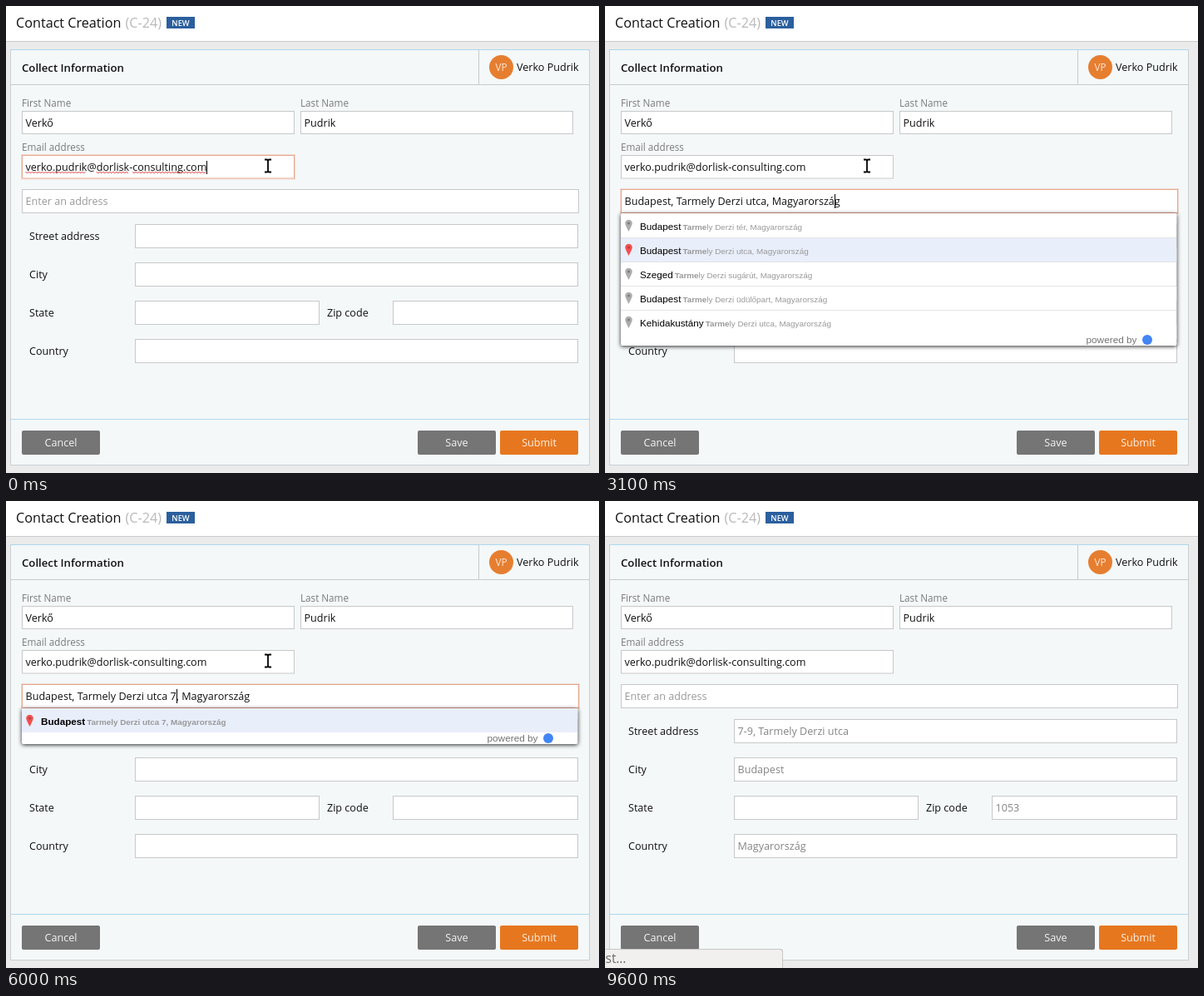
An HTML page with a canvas for the animation above (10 s loop, 713 px wide and 561 px high).

```html
<!DOCTYPE html>
<html lang="en">
<head>
<meta charset="utf-8">
<title>Contact Creation</title>
<style>
html, body { margin: 0; width: 100%; height: 100%; overflow: hidden; background: #ebebeb; }
canvas { display: block; }
</style>
</head>
<body>
<canvas id="stage" width="713" height="561"></canvas>
<script>
const ctx = document.getElementById('stage').getContext('2d');
const LOOP = 10000;
const SANS = '"Open Sans", "Noto Sans", sans-serif';
const ARIAL = '"Liberation Sans", Arial, sans-serif';
const BODY = `12.6px ${SANS}`;
const LABEL = `11.7px ${SANS}`;
const BORDER = '#c8c8c8';
const FOCUS = '#e6a78e';

const PERSON = { first: 'Verkő', last: 'Pudrik', full: 'Verko Pudrik', initials: 'VP' };
const EMAIL = ['verko.pudrik', '@', 'dorlisk', '-', 'consulting.com'];
const STREET = 'Tarmely Derzi';
const COUNTRY = 'Magyarország';
const PLACES = [
  ['Budapest', 'tér'], ['Budapest', 'utca'], ['Szeged', 'sugárút'],
  ['Budapest', 'üdülőpart'], ['Kehidakustány', 'utca']
];
const address = kind => `Budapest, ${STREET} ${kind}, ${COUNTRY}`;

// Address field: [start, text, caret distance from the end]
const TYPING = [
  [100, '', 0], [800, 't', 0], [900, 'ta', 0], [1000, 'tar', 0],
  [1200, 'tarm', 0], [1300, 'tarme', 0],
  [2300, address('tér'), 0], [2700, address('utca'), 0], [3100, address('utca'), 1],
  [3600, address('utca'), 4], [3700, address('utca'), 8], [3800, address('utca'), 12],
  [4300, address('utca'), 13], [4600, address('utca'), 14],
  [4800, address('utca '), 14], [5100, address('utca 7'), 14], [9100, '', 0]
];

// Suggestions: [start, row count, selected row, matched characters]
const LISTS = [
  [0, 0], [1300, 5, -1, 4], [1600, 5, -1, 5], [2300, 5, 0, 5], [2700, 5, 1, 5],
  [5100, 5, -1, 13], [5500, 1, -1, 99], [6000, 1, 0, 99], [6500, 0]
];

// Pointer: [start, shape, x, y]
const POINTER = [
  [0, 'beam', 315, 192], [7400, 'beam', 375, 275], [7500, 'arrow', 460, 386],
  [7600, 'arrow', 553, 477], [7700, 'none', 0, 0], [7900, 'hand', 548, 522],
  [8000, 'hand', 556, 529], [8100, 'arrow', 573, 542], [8300, 'busy', 590, 550],
  [8400, 'busy', 596, 557], [8500, 'busy', 600, 566], [8600, 'none', 0, 0]
];

const stepAt = (steps, t) => steps.filter(s => s[0] <= t).pop();

function rect(x, y, w, h, color) {
  ctx.fillStyle = color;
  ctx.fillRect(x, y, w, h);
}

function text(str, x, y, font = BODY, color = '#111', align = 'left') {
  ctx.font = font;
  ctx.fillStyle = color;
  ctx.textAlign = align;
  ctx.fillText(str, x, y);
  return x + ctx.measureText(str).width;
}

function width(str, font = BODY) {
  ctx.font = font;
  return ctx.measureText(str).width;
}

function field(x, y, w, h, value = '', color = '#111', focused = false) {
  if (focused) {
    ctx.strokeStyle = 'rgba(230,150,120,.3)';
    ctx.strokeRect(x - .5, y - .5, w + 1, h + 1);
  }
  rect(x, y, w, h, '#fff');
  ctx.strokeStyle = focused ? FOCUS : BORDER;
  ctx.lineWidth = 1;
  ctx.strokeRect(x + .5, y + .5, w - 1, h - 1);
  text(value, x + 4.5, y + 19, BODY, color);
}

function rounded(x, y, w, h, r, color) {
  ctx.fillStyle = color;
  ctx.beginPath();
  ctx.roundRect(x, y, w, h, r);
  ctx.fill();
}

function button(label, x, color, ink) {
  rounded(x, 510, 94, 29, 2, color);
  text(label, x + 47, 529, BODY, ink, 'center');
}

function disc(x, y, r, color) {
  ctx.fillStyle = color;
  ctx.beginPath();
  ctx.arc(x, y, r, 0, 7);
  ctx.fill();
}

function drawPage() {
  rect(0, 0, 713, 561, '#ebebeb');
  rect(0, 0, 713, 42, '#fff');
  rect(0, 42, 713, 1, '#cbcbcb');
  text('Contact Creation', 12, 25.5, `16.2px ${SANS}`, '#111');
  text('(C-24)', 143.5, 25.5, `16.2px ${SANS}`, '#b9b9b9');
  rect(193, 13, 34, 14, '#2b5f9e');
  text('NEW', 210, 23.5, `600 9.3px ${SANS}`, '#fff', 'center');

  rect(5, 52, 697, 500, '#c9d0d3');
  rect(6, 53, 695, 498, '#f4f8f9');
  rect(5, 52, 697, 1, '#add8ee');
  rect(6, 94, 695, 1, '#c6cbcd');
  rect(568, 53, 1, 41, '#c6cbcd');
  rect(6, 496, 695, 1, '#add8ee');
  text('Collect Information', 19, 79, `600 13.2px ${SANS}`);
  disc(595.5, 73.5, 14.5, '#e67e30');
  text(PERSON.initials, 595.5, 78, `11.7px ${SANS}`, '#fbe6d6', 'center');
  text(PERSON.full, 614, 78);

  text('First Name', 19, 121, LABEL, '#7b7b7b');
  text('Last Name', 354, 121, LABEL, '#7b7b7b');
  text('Email address', 19, 174, LABEL, '#7b7b7b');
  text('Street address', 28, 281);
  text('City', 28, 327);
  text('State', 28, 373);
  text('Zip code', 386, 373);
  text('Country', 28, 419);
}

function squiggle(x, end, y) {
  ctx.strokeStyle = '#e03c3c';
  ctx.beginPath();
  for (let i = 0; x + i < end; i += 2) ctx.lineTo(x + i, y + (i % 4 ? 1 : -1));
  ctx.stroke();
}

function drawFields(t) {
  const editing = t < 100;
  const email = EMAIL.join('');
  field(19, 126, 328, 28, PERSON.first);
  field(354, 126, 328, 28, PERSON.last);
  field(19, 179, 328, 28.5, email, '#111', editing);
  if (editing) {
    let x = 23.5;
    EMAIL.forEach((part, i) => {
      const end = x + width(part);
      if (i % 2 === 0) squiggle(x, end, 200);
      x = end;
    });
    rect(Math.round(x), 186, 1, 16, '#000');
  }

  const [, value, back] = stepAt(TYPING, t) || [0, '', 0];
  const focused = t >= 100 && t < 8300;
  field(19, 220, 670, 29, value || 'Enter an address', value ? '#111' : '#9a9a9a', focused);
  if (focused) {
    const caret = 23.5 + width(value.slice(0, value.length - back));
    rect(Math.round(caret), 226, 1, 17, '#000');
  }

  const filled = t >= 6700;
  const ink = t >= 9100 ? '#858585' : '#111';
  const show = str => filled ? str : '';
  field(155, 262, 533, 29, show(`7-9, ${STREET} utca`), ink);
  field(155, 308, 533, 29, show('Budapest'), ink);
  field(155, 354, 222, 29);
  field(465, 354, 223, 29, show('1053'), ink);
  field(155, 400, 533, 29, show(COUNTRY), ink);
}

function drawButtons(t) {
  const disabled = t >= 8300 && t < 9100;
  const hover = t >= 7900 && t < 8100;
  const gray = disabled ? '#a3a4a4' : '#757575';
  const ink = disabled ? '#e6e6e6' : '#f4f4f4';
  button('Cancel', 19, gray, ink);
  button('Save', 495, hover ? '#626262' : gray, ink);
  button('Submit', 594, disabled ? '#d69468' : '#e6771f', disabled ? '#f1ddcf' : '#fdf0e5');
}

function pin(x, y, color) {
  ctx.fillStyle = color;
  ctx.beginPath();
  ctx.arc(x, y, 4.3, Math.PI * .9, Math.PI * .1);
  ctx.quadraticCurveTo(x + 3.2, y + 4, x, y + 10);
  ctx.quadraticCurveTo(x - 3.2, y + 4, x - 4.1, y + 1.3);
  ctx.fill();
  disc(x, y, 1.5, 'rgba(70,50,50,.45)');
}

function drawSuggestions(t) {
  const [, count, selected, match] = stepAt(LISTS, t);
  if (!count) return;
  const bottom = 249 + count * 29 + 14;
  ctx.save();
  ctx.shadowColor = 'rgba(0,0,0,.85)';
  ctx.shadowBlur = 5;
  ctx.shadowOffsetY = 1;
  rounded(19, 249, 668.5, bottom - 249, 2, '#fff');
  ctx.restore();

  const single = count === 1;
  const rows = single ? [['Budapest', 'utca 7']] : PLACES;
  rows.forEach(([city, kind], i) => {
    const y = 249 + i * 29;
    if (i === selected) rect(19, y, 668, 29, '#e9eefb');
    if (i) rect(19, y, 668, 1, '#e4e4e4');
    pin(28.5, y + 12, i === selected ? '#f4504f' : '#adadad');
    const end = text(city, 42, y + 19.5, `${single ? 'bold ' : ''}11.7px ${ARIAL}`, '#000');
    const detail = `${STREET} ${kind}, ${COUNTRY}`;
    const mid = text(detail.slice(0, match), end + 2, y + 19.5, `bold 9.9px ${ARIAL}`, '#999');
    text(detail.slice(match), mid, y + 19.5, `9.9px ${ARIAL}`, '#999');
  });
  text('powered by', 578.5, bottom - 3, `11.8px ${ARIAL}`, '#737373');
  disc(652, bottom - 7, 6, '#4285f4');
}

function polygon(points, fill, stroke) {
  ctx.beginPath();
  points.forEach(([x, y]) => ctx.lineTo(x, y));
  ctx.closePath();
  ctx.fillStyle = fill;
  ctx.fill();
  ctx.strokeStyle = stroke;
  ctx.stroke();
}

const SHAPES = {
  none() {},
  beam() {
    for (const [lineWidth, color] of [[4, '#fff'], [1.8, '#000']]) {
      ctx.lineWidth = lineWidth;
      ctx.strokeStyle = color;
      ctx.beginPath();
      for (const s of [-1, 1]) {
        ctx.moveTo(-4, s * 7.5);
        ctx.lineTo(-1.2, s * 7.5);
        ctx.lineTo(0, s * 6.5);
        ctx.lineTo(1.2, s * 7.5);
        ctx.lineTo(4, s * 7.5);
      }
      ctx.moveTo(0, -7);
      ctx.lineTo(0, 7);
      ctx.stroke();
    }
  },
  arrow() {
    polygon([[0, 0], [0, 16], [4, 12.5], [7, 18.5], [9.5, 17.5], [6.8, 11.5], [12, 11.5]], '#000', '#fff');
  },
  hand() {
    polygon([[-1.5, 0], [1.5, 0], [1.5, 6], [9, 8], [9, 13], [7, 18], [-2, 18], [-6, 11], [-5, 9], [-1.5, 12]], '#fff', '#000');
  },
  busy(t) {
    disc(0, 0, 9, '#fff');
    ctx.strokeStyle = '#111';
    ctx.lineWidth = 1.5;
    ctx.beginPath();
    ctx.arc(0, 0, 8.5, 0, 7);
    ctx.stroke();
    ctx.rotate(t / 1000 * Math.PI * 2);
    for (let i = 0; i < 10; i++) {
      ctx.rotate(Math.PI / 5);
      rect(-.6, -6.5, 1.2, 3, `rgba(0,0,0,${.15 + i * .07})`);
    }
  }
};

function drawPointer(t) {
  const [, shape, x, y] = stepAt(POINTER, t);
  ctx.save();
  ctx.translate(x, y);
  SHAPES[shape](t);
  ctx.restore();
}

function drawStatus(t) {
  if (t < 8600) return;
  rounded(-4, 538, 218, 30, 3, '#c6c6c6');
  rounded(-4, 539, 217, 30, 3, '#f1f0ef');
  text('st…', .5, 555, `15.5px ${SANS}`, '#6b6b6b');
}

function draw(now) {
  const t = Math.floor(now % LOOP / 100) * 100;
  ctx.lineWidth = 1;
  drawPage();
  drawFields(t);
  drawButtons(t);
  drawSuggestions(t);
  drawStatus(t);
  drawPointer(t);
}

const start = performance.now();
function tick() {
  draw(performance.now() - start);
  requestAnimationFrame(tick);
}
tick();
</script>
</body>
</html>
```
